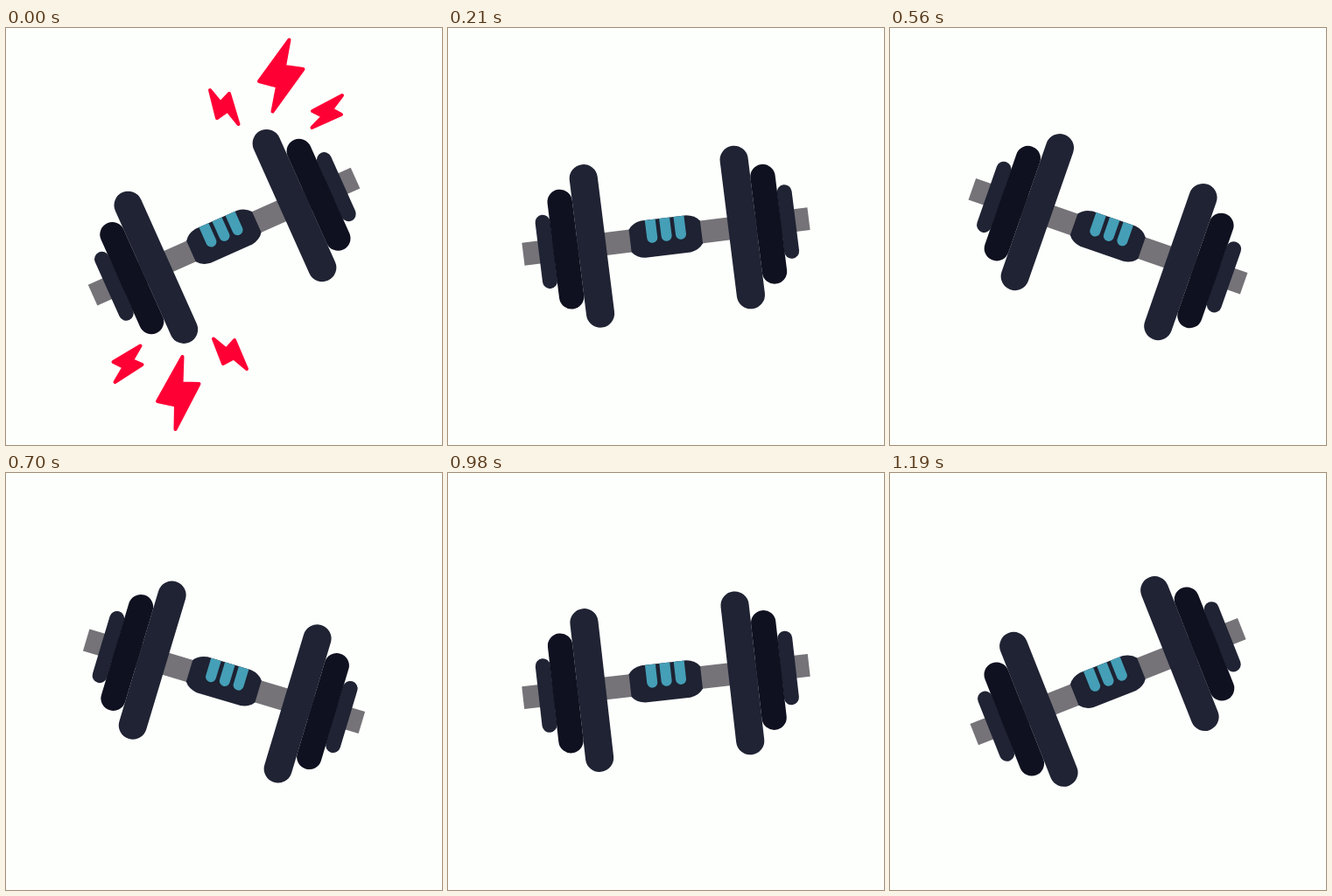
An HTML page for the animation above (1.26 s loop, 498x477 px).

```html
<!DOCTYPE html>
<html lang="en">
<head>
<meta charset="utf-8">
<title>Swinging dumbbell</title>
<style>
  html, body { margin: 0; width: 100%; height: 100%; overflow: hidden; background: #fdfffc; }
  svg { display: block; width: 100vw; height: 100vh; }
  .bolt { fill: #ff0035; stroke: #ff0035; stroke-width: 4; stroke-linejoin: round; }
</style>
</head>
<body>
<svg viewBox="0 0 498 477" preserveAspectRatio="none">
  <defs>
    <g id="topBolts" class="bolt">
      <path d="M323.5 13.5L289 61 310 66.5 304.5 95.5 339.5 47 318 44Z"/>
      <path d="M233 71L241 103 253 94.5 265.5 110 255 75 245 85.5Z"/>
      <path d="M384 77L350 95 362 101 349.5 114 383 99 372 93Z"/>
    </g>
    <g id="lowBolts" class="bolt">
      <path d="M201.5 376L173 427 194 431.5 193.5 459 220.5 407 200.5 406.5Z"/>
      <path d="M153.5 363.5L122.5 382 134.5 388 124.5 405 155.5 385 144 380Z"/>
      <path d="M237 355.5L248 384 260 377.5 275 390 261 357 251.5 367.5Z"/>
    </g>
    <g id="plates">
      <rect x="130.6" y="-42.5" width="17" height="85" rx="8.5" fill="#1f2333"/>
      <rect x="102.6" y="-68.8" width="28.4" height="137.6" rx="14.2" fill="#0f1120"/>
      <rect x="70.5" y="-93.9" width="32.2" height="187.8" rx="16.1" fill="#1f2333"/>
    </g>
    <clipPath id="gripShape">
      <path id="grip" d="M-41-13Q-36-20-26-21.3H26Q36-20 41-13V13Q36 20 26 21.3H-26Q-36 20-41 13Z"/>
    </clipPath>
  </defs>

  <g id="rightBolts">
    <use href="#topBolts"/>
    <use href="#lowBolts"/>
  </g>
  <g id="leftBolts">
    <use href="#topBolts" transform="translate(499 11) scale(-1 1)"/>
    <use href="#lowBolts" transform="translate(499 -3) scale(-1 1)"/>
  </g>

  <g id="dumbbell">
    <rect x="-164.8" y="-13" width="328.6" height="26" fill="#757378"/>
    <g transform="translate(.8 .4)">
      <use href="#plates"/>
      <use href="#plates" transform="scale(-1 1)"/>
    </g>
    <g transform="translate(-.7 0)">
      <use href="#grip" fill="#1e2232"/>
      <g clip-path="url(#gripShape)" stroke="#459fb7" stroke-width="12" stroke-linecap="round">
        <path d="M-15.6-30V-.6M.9-30V-.6M17.4-30V-.6"/>
      </g>
    </g>
  </g>
</svg>
<script>
  const STEP = 70;
  // Half a swing in degrees; the way back is the same with the sign turned.
  const SWING = [-22.9, -17.9, -11.9, -5.9, -0.3, 5.3, 10.8, 15.6, 20.4];
  const TILT = -1.2;
  const HALF = SWING.length;
  const byId = id => document.getElementById(id);
  const dumbbell = byId('dumbbell');
  const rightBolts = byId('rightBolts');
  const leftBolts = byId('leftBolts');

  const show = (el, on) => el.setAttribute('visibility', on ? 'visible' : 'hidden');

  function draw(ms) {
    const step = Math.floor(ms / STEP) % (2 * HALF);
    const sign = step < HALF ? 1 : -1;
    const angle = TILT + sign * SWING[step % HALF];
    dumbbell.setAttribute('transform', `translate(249.5 238.4) rotate(${angle})`);
    show(rightBolts, step === 0);
    show(leftBolts, step === HALF);
  }

  const start = performance.now();
  function tick() {
    draw(performance.now() - start);
    requestAnimationFrame(tick);
  }
  tick();
</script>
</body>
</html>
```
